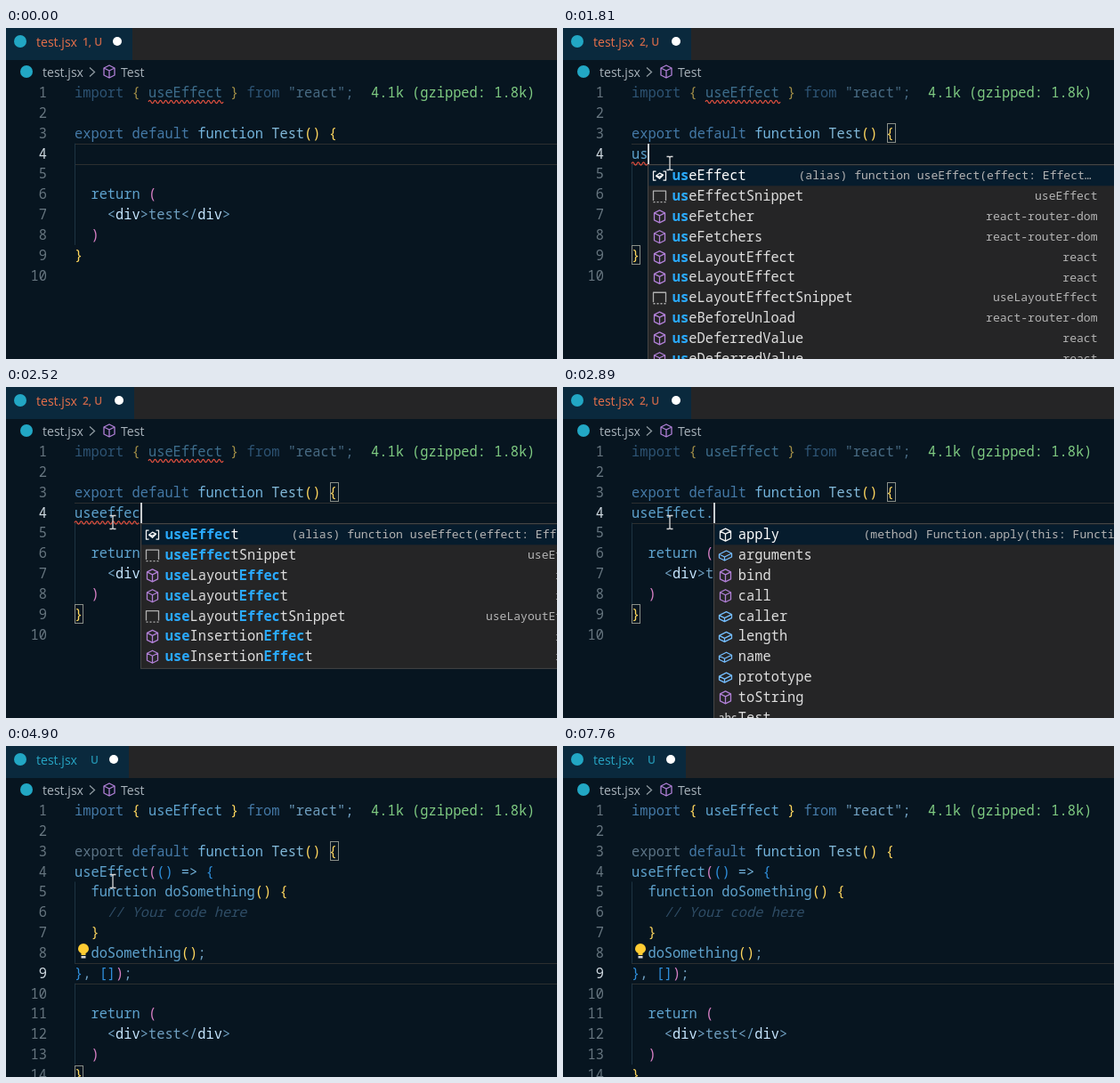
Animation, 619 px wide and 372 px high, one loop 7.85 s. Source, as an HTML page:

```html
<!DOCTYPE html>
<html lang="en">
<head>
<meta charset="utf-8">
<title>Editor typing loop</title>
<style>
  html, body { margin: 0; width: 100%; height: 100%; overflow: hidden; background: #071520; }
  svg { display: block; }
  text { white-space: pre; font: 15.37px "Noto Sans Mono", "DejaVu Sans Mono", monospace; }
  .ui { font: 14.1px "Open Sans", "Noto Sans", sans-serif; }
  .badge { font: 600 12px "Open Sans", "Noto Sans", sans-serif; }
  .detail { font-size: 13.07px; fill: #b4b4b4; }
  .hit { font-weight: 700; fill: #2aaaff; }
  .num { fill: #66757f; text-anchor: end; }
  .num.on { fill: #cfd9e0; }
  .icon { fill: none; stroke-width: 1.3; stroke-linejoin: round; }
  .k { fill: #4479a6; }
  .x { fill: #5b7385; }
  .K { fill: #74b4dc; }
  .f { fill: #5fa3ce; }
  .n { fill: #82b8d8; }
  .d { fill: #c5e4fd; }
  .s { fill: #6f9fc0; }
  .y { fill: #ffd75e; }
  .p { fill: #d77fc4; }
  .b { fill: #2f8fdc; }
  .c { fill: #2f4d66; font-style: italic; }
  .g { fill: #7fcb82; }
</style>
</head>
<body>
<svg id="stage" width="619" height="372" viewBox="0 0 619 372"></svg>
<script>
const LOOP = 7850, LEFT = 77, CHAR = 9.222, LINE = 22.84;
const CLICK = 710, EXPAND = 4380;
const stage = document.getElementById('stage');

const centre = n => 72.6 + LINE * (n - 1);
const column = n => LEFT + CHAR * n;
const esc = s => s.replace(/&/g, '&amp;').replace(/</g, '&lt;').replace(/>/g, '&gt;');
const text = (x, y, cls, s, more = '') => `<text x="${x}" y="${y}" class="${cls}" ${more}>${s}</text>`;
const rect = (x, y, w, h, fill, more = '') =>
  `<rect x="${x}" y="${y}" width="${w}" height="${h}" fill="${fill}" ${more}/>`;

// Each part of a code line starts with the letter of its colour class.
const code = (n, line, more = '') => text(LEFT, centre(n) + 5.4, '',
  line.split('|').map(p => `<tspan class="${p[0]}">${esc(p.slice(1))}</tspan>`).join(''), more);

const returnLines = ['s  |freturn |p(', 's    <|ddiv|s>test</|ddiv|s>', 'p  )', 'y}'];
const effectLines = [
  'fuseEffect|p(|b() |K=> |b{',
  'f  function doSomething|y() {',
  'c    // Your code here',
  'y  }',
  'f  doSomething|y()|s;',
  'b}|s, |b[]|p)|s;'
];

// Typing schedule for the fourth line.
const typed = [[0, '']];
const type = (start, step, from, full) => {
  for (let i = from; i <= full.length; i++) typed.push([start + step * (i - from), full.slice(0, i)]);
};
type(1580, 150, 1, 'usee');
typed.push([2110, 'useef'], [2240, 'useeff'], [2380, 'useeffe'], [2520, 'useeffec'], [2740, 'useeffect'],
  [2890, 'useEffect.'], [3040, 'useEffect.d'], [3210, 'useEffect.do'], [3430, 'useEffect.doS']);
type(3580, 580 / 7, 14, 'useEffect.doSomething');

const typedAt = t => typed.filter(([at]) => at <= t).pop()[1];

const router = 'react-router-dom';
const hooks = [
  ['alias', 'useEffect', '(alias) function useEffect(effect: Effect…', 169],
  ['snippet', 'useEffectSnippet', 'useEffect'],
  ['cube', 'useFetcher', router],
  ['cube', 'useFetchers', router],
  ['cube', 'useLayoutEffect', 'react'],
  ['cube', 'useLayoutEffect', 'react'],
  ['snippet', 'useLayoutEffectSnippet', 'useLayoutEffect'],
  ['cube', 'useBeforeUnload', router],
  ['cube', 'useDeferredValue', 'react'],
  ['cube', 'useDeferredValue', 'react']
];
const effects = hooks.filter(h => h[1].includes('Effect')).concat([
  ['cube', 'useInsertionEffect', 'react'],
  ['cube', 'useInsertionEffect', 'react']
]);
const members = [
  ['cube', 'apply', '(method) Function.apply(this: Function, …', 168],
  ['brick', 'arguments'], ['cube', 'bind'], ['cube', 'call'], ['brick', 'caller'],
  ['brick', 'length'], ['brick', 'name'], ['brick', 'prototype'], ['cube', 'toString'], ['abc', 'Test']
];
const snippets = [
  ['snippet', 'dob', 'destructuring', 370],
  ['snippet', 'dowhile', 'Do-While Loop', 362]
];

const shapes = {
  cube: 'M0-7 6-4V4L0 7-6 4V-4ZM-6-4 0-1 6-4M0-1V7',
  brick: 'M-7-1 1-5 7-2V2L-1 6-7 3ZM-7-1-1 2 7-2M-1 2V6',
  alias: 'M-4-5H-7V5H-4M4-5H7V5H4M-4 0 0-3 4-1 0 3ZM-4 0 0 1 4-1',
  snippet: 'M-7 5V-6H7V5M-7 6.5h2m2 0h2m2 0h2m2 0h2'
};
const tints = { cube: '#b180d7', brick: '#75beff', alias: '#75beff', snippet: '#b0b0b0' };

function icon(kind, x, y, tint = tints[kind]) {
  if (kind === 'abc') return text(x - 8, y + 4, 'badge', 'abc', 'fill="#c5c5c5"');
  return `<path class="icon" transform="translate(${x} ${y})" stroke="${tint}" d="${shapes[kind]}"/>`;
}

function highlight(label, query) {
  const head = Math.min(query.length, 3);
  const tail = query.slice(head).toLowerCase();
  const hit = s => `<tspan class="hit">${s}</tspan>`;
  let at = label.toLowerCase().indexOf(tail, head);
  if (at < 0) at = label.toLowerCase().indexOf([...tail].reverse().join(''), head);
  const end = at + tail.length;
  return hit(label.slice(0, head)) + label.slice(head, at) + hit(label.slice(at, end)) + label.slice(end);
}

function popup(x, rows, query) {
  const top = 153.5;
  let out = rect(x, top, 530, rows.length * LINE + 3, '#252526', 'stroke="#454545"')
    + rect(x + 1, top + 1, 528, LINE, '#061c2d');
  rows.forEach(([kind, label, detail, offset], i) => {
    const y = 166.2 + i * LINE;
    out += icon(kind, x + 13, y, i ? undefined : '#f4f4f4')
      + text(x + 27.3, y + 5, '', query ? highlight(label, query) : label, `fill="${i ? '#dedede' : '#fff'}"`);
    if (detail) out += offset
      ? text(x + offset, y + 4.2, 'detail', esc(detail))
      : text(x + 505, y + 4.2, 'detail', detail, 'text-anchor="end"');
  });
  return out;
}

function suggestions(t, word) {
  const x = Math.round(column(word.length)) + .5;
  if (t < 1650 || t >= 3430) return '';
  if (t < 2890) return popup(x, word.length > 5 ? effects : hooks, word);
  return t < 3040 ? popup(x, members) : popup(x, snippets, word.split('.')[1]);
}

function squiggle(x, y, width) {
  return `<path d="M${x} ${y}${'q1.5-3.4 3 0t3 0'.repeat(Math.max(1, Math.round(width / 6)))}" fill="none" stroke="#e0503f" stroke-width="1.2"/>`;
}

function header(t) {
  const errors = t < 1800 ? 1 : t < 3120 ? 2 : 0;
  const tint = errors ? '#e8704a' : '#27a5c4';
  const width = [138, 142, 144][errors], dot = [121, 125, 127][errors];
  const logo = (x, y) => `<circle cx="${x}" cy="${y}" r="7" fill="#22a7c4"/>`;
  return rect(0, 0, 619, 36, '#252526') + rect(0, 0, width, 36, '#0a293d')
    + logo(16, 15) + text(34, 21, 'ui', 'test.jsx', `fill="${tint}"`)
    + text(errors ? 86 : 95, 20, 'badge', errors ? errors + ', U' : 'U', `fill="${tint}" opacity=".85"`)
    + `<circle cx="${dot}" cy="15" r="5" fill="#fff"/>`
    + logo(23, 49) + text(41, 54.5, 'ui', 'test.jsx', 'fill="#a9b4bc"')
    + '<path d="M94 44.5 99.500 49.500 94 54.500" fill="none" stroke="#8d989f" stroke-width="1.3"/>'
    + icon('cube', 116, 49) + text(129, 54.5, 'ui', 'Test', 'fill="#a9b4bc"');
}

const between = (t, a, b) => t >= a && t < b;

function caretOn(t) {
  if (t < EXPAND) return between(t, CLICK, 1210) || t >= 1580;
  return !(between(t, 4900, 5400) || between(t, 5860, 6370) || between(t, 6870, 7360) || t >= 7760);
}

function along(points, p) {
  const i = Math.max(1, points.findIndex(q => q[0] >= p));
  const [a, b] = [points[i - 1], points[i]];
  const k = (p - a[0]) / (b[0] - a[0]);
  return [1, 2].map(j => a[j] + (b[j] - a[j]) * k);
}

const arrive = [[0, 443, 314], [.3, 270, 250], [.6, 62, 178], [.8, 98, 157], [1, 120, 152]];
const leave = [[0, 119, 153], [.17, 113, 163], [.5, 245, 235], [1, 538, 358]];

function pointer(t) {
  if (t < 70 || t >= 7360) return '';
  const step = 530 / 7;
  const [x, y] = t < 6830
    ? along(arrive, Math.min(1, Math.floor((t - 70) / 71) / 10))
    : along(leave, Math.floor((t - 6830) / step) / 6);
  return `<path transform="translate(${x.toFixed(1)} ${y.toFixed(1)})" fill="none" stroke="#d8d8d8" stroke-width="1.3" d="M-3.500-7.500H-1L0-6.500 1-7.500H3.500M0-6.500V6.500M-3.500 7.500H-1L0 6.500 1 7.500H3.500"/>`;
}

function bracketBoxes(last) {
  const box = (x, n) => rect(x + .5, Math.round(centre(n) - 11) + .5, 9, 21, 'none', 'stroke="#8a8f88"');
  return box(364, 3) + box(77, last);
}

function guide(from, to) {
  const y = centre(from) - LINE / 2;
  return rect(77, y, 1, (to - from + 1) * LINE, '#1d3442');
}

function scene(t) {
  const expanded = t >= EXPAND;
  const word = typedAt(t);
  const active = expanded ? 9 : 4, last = expanded ? 14 : 9;
  const rowTop = Math.round(centre(active) - LINE / 2);

  let out = rect(0, 0, 619, 372, '#071520') + header(t);
  out += rect(77, rowTop, 542, 1, '#2c2f30') + rect(77, rowTop + 23, 542, 1, '#2c2f30');
  out += expanded ? guide(5, 8) + guide(10, 13) : guide(word ? 5 : 4, 8);

  for (let n = 1; n <= (expanded ? 14 : 10); n++)
    out += text(46, centre(n) + 5.4, n === active ? 'num on' : 'num', n);

  out += code(1, 'kimport |y{ |fuseEffect|y }|k from |s"react";', t < 4750 ? 'opacity=".62"' : '')
    + text(410, centre(1) + 5.4, 'g', '4.1k (gzipped: 1.8k)');
  if (t < 2890) out += squiggle(160, 83, 84);

  out += code(3, (t < 3430 ? 'kexport' : 'xexport') + '|k default |Kfunction |nTest|y() {');
  if (expanded) effectLines.forEach((l, i) => out += code(4 + i, l));
  else if (word) {
    out += code(4, 'f' + word);
    if (t < 2890) out += squiggle(77, 152.5, CHAR * word.length);
  }
  returnLines.forEach((l, i) => out += code(last - 3 + i, l));

  if (between(t, CLICK, 7760)) out += bracketBoxes(last);
  if (t >= 4600)
    out += '<path d="M84.500 235v-2q-3.500-2-3.500-5a6 6 0 0 1 12 0q0 3-3.500 5v2Z" fill="#ffcc33"/>'
      + rect(84.5, 236, 5, 2.5, '#d8d8d8');

  out += suggestions(t, word);
  if (caretOn(t)) out += rect(Math.round(column(expanded ? 7 : word.length)), rowTop, 2, 23, '#c9cdd0');
  return out + pointer(t);
}

let shown = '';
function tick(now) {
  const next = scene((now - start) % LOOP);
  if (next !== shown) stage.innerHTML = shown = next;
  requestAnimationFrame(tick);
}
const start = performance.now();
stage.innerHTML = shown = scene(0);
requestAnimationFrame(now => tick(Math.max(now, start)));
</script>
</body>
</html>
```
